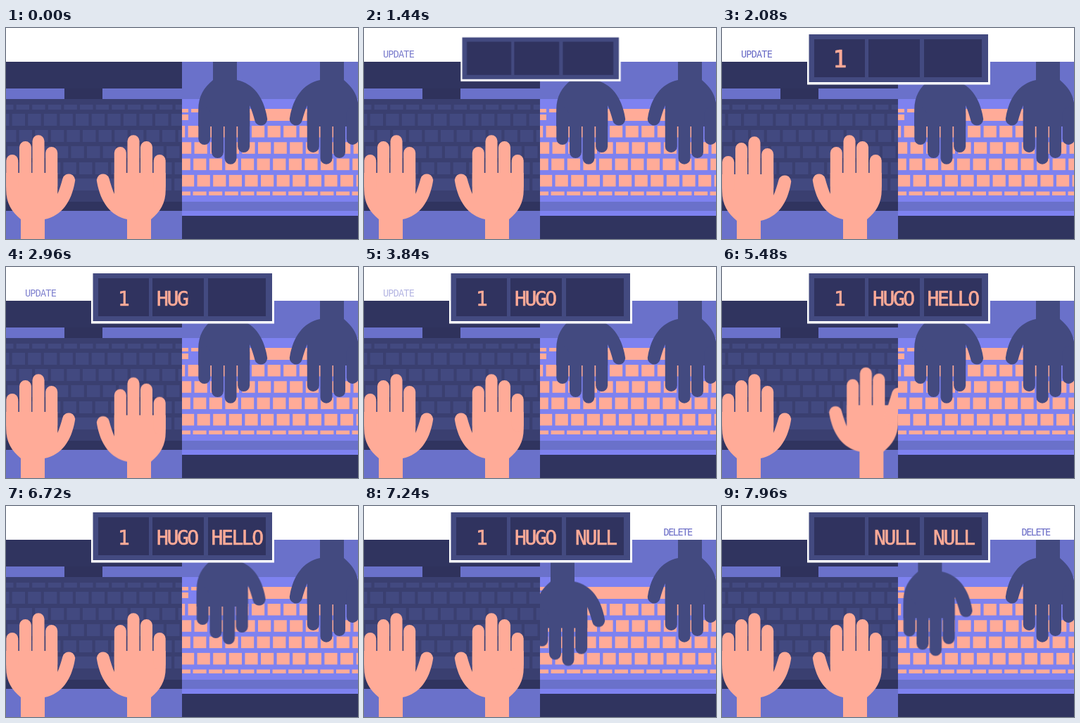
Recreate the animation shown at these times as an HTML page. Size 500 by 300 pixels, loop 8000 ms.

```html
<!DOCTYPE html>
<html lang="en">
<head>
<meta charset="utf-8">
<title>Update and delete</title>
<style>
html, body { margin: 0; width: 100%; height: 100%; overflow: hidden; background: #fff; }
svg { display: block; width: 100%; height: 100%; }
text { font-family: "DejaVu Sans Mono", "Liberation Mono", monospace; }
.label { font-size: 13.5px; letter-spacing: -.8px; fill: #696bc6; }
.word { font-size: 28px; letter-spacing: -2.4px; fill: #ffab98; stroke: #ffab98; stroke-width: .6px; }
.finger { fill: none; stroke: currentColor; stroke-width: 17px; stroke-linecap: round; }

.hand, .panel, .label, .word, #pinky { animation: 8s ease-in-out infinite; }
.word { animation-timing-function: step-end; }
.panel, #one { transform-box: fill-box; transform-origin: center; }

.panel { animation-name: panel; }
#update { animation-name: update; }
#delete { animation-name: delete; letter-spacing: -1.45px; }
#one { animation-name: one; animation-timing-function: ease-out; }
#name { animation-name: name; }
#greeting { animation-name: greeting; }
#nullName { animation-name: nullName; }
#nullGreeting { animation-name: nullGreeting; }
#left { animation-name: left; }
#right { animation-name: right; }
#pinky { animation-name: pinky; transform-origin: 218px 216px; }
#eraser { animation-name: eraser; }

@keyframes panel {
  0%, 15% { transform: scale(0); }
  19%, 100% { transform: scale(1); }
}
@keyframes update {
  0%, 16.5% { opacity: 0; }
  18.5%, 32% { opacity: 1; animation-timing-function: linear; }
  63%, 100% { opacity: 0; }
}
@keyframes delete {
  0%, 85.5% { opacity: 0; }
  88%, 100% { opacity: 1; }
}
@keyframes one {
  0%, 25.45% { opacity: 0; transform: scale(1.3); }
  25.5% { opacity: 1; transform: scale(1.3); }
  28%, 95.45% { opacity: 1; transform: none; }
  95.5%, 100% { opacity: 0; transform: none; }
}
@keyframes name {
  0% { clip-path: inset(0 100% 0 0); }
  29.5% { clip-path: inset(0 75% 0 0); }
  32% { clip-path: inset(0 50% 0 0); }
  34.5% { clip-path: inset(0 25% 0 0); }
  37.5% { clip-path: inset(0 -10% 0 0); }
  92%, 100% { clip-path: inset(0 100% 0 0); }
}
@keyframes greeting {
  0% { clip-path: inset(0 100% 0 0); }
  49% { clip-path: inset(0 80% 0 0); }
  52.5% { clip-path: inset(0 60% 0 0); }
  55.5% { clip-path: inset(0 40% 0 0); }
  58.5% { clip-path: inset(0 20% 0 0); }
  61.5% { clip-path: inset(0 -10% 0 0); }
  88.5%, 100% { clip-path: inset(0 100% 0 0); }
}
@keyframes nullName { 0% { opacity: 0; } 92%, 100% { opacity: 1; } }
@keyframes nullGreeting { 0% { opacity: 0; } 88.5%, 100% { opacity: 1; } }
@keyframes left {
  0%, 19.5% { transform: none; }
  22.5% { transform: translate(5px, -16px); }
  24% { transform: translate(5px, -12px); }
  26% { transform: translate(0, 2px); }
  27.5% { transform: none; }
  29.5% { transform: translate(0, 5px); }
  30.5% { transform: none; }
  32% { transform: translate(4px, -7px); }
  33% { transform: none; }
  34.5% { transform: translate(-1px, 5px); }
  36.5%, 100% { transform: none; }
}
@keyframes right {
  0%, 36% { transform: none; }
  37.5% { transform: translate(0, 6px); }
  39.5%, 48% { transform: none; }
  49% { transform: translate(0, 5px); }
  51% { transform: none; }
  52.5% { transform: translate(-2px, -6px); }
  54% { transform: none; }
  55.5% { transform: translate(4px, 5px); }
  57% { transform: translate(4px, 0); }
  58.5% { transform: translate(4px, 5px); }
  60% { transform: translate(4px, -2px); }
  61.5% { transform: translate(6px, -7px); }
  63% { transform: none; }
  66%, 67.5% { transform: translate(27px, -11px); }
  71.5%, 100% { transform: none; }
}
@keyframes pinky {
  0%, 63% { transform: none; }
  66%, 67.5% { transform: rotate(20deg); }
  71.5%, 100% { transform: none; }
}
@keyframes eraser {
  0%, 83.1% { transform: none; }
  87.5% { transform: translate(-29px, 34px); }
  88.5% { transform: translate(-29px, 37px); }
  90% { transform: translate(-29px, 33px); }
  92%, 97% { transform: translate(-29px, 37px); animation-timing-function: linear; }
  100% { transform: translate(-13px, 16px); }
}
</style>
</head>
<body>
<svg viewBox="0 0 500 300" preserveAspectRatio="none">
  <defs>
    <clipPath id="leftHalf"><rect y="48" width="250" height="252"/></clipPath>
    <clipPath id="rightHalf"><rect x="250" y="48" width="250" height="252"/></clipPath>
    <g id="palm">
      <path class="finger" d="M27.5 169.5V225M46 160.7V225M64.7 177.5V225"/>
      <path d="M.2 206H73.2V236Q77 227 80.5 214A8.8 8.8 0 0 1 97.8 219C93 247 79 267 55 272V400H21V272C8 261 .2 249 .2 230Z" fill="currentColor"/>
    </g>
    <path id="littleFinger" class="finger" d="M8.8 188.5V225"/>
    <g id="hand"><use href="#palm"/><use href="#littleFinger"/></g>
  </defs>

  <g clip-path="url(#leftHalf)">
    <rect y="48" width="250" height="252" fill="#30345f"/>
    <rect y="86" width="250" height="15" fill="#6a71ca"/>
    <rect x="83" y="86" width="54" height="15" fill="#2f325c"/>
    <rect y="101" width="250" height="146" fill="#3a3f70"/>
    <g id="darkKeys" fill="#424980"/>
    <rect y="260" width="250" height="40" fill="#6a71ca"/>
    <g color="#ffab98">
      <g id="left" class="hand"><use href="#hand"/></g>
      <g id="right" class="hand">
        <use href="#palm" transform="translate(227) scale(-1 1)"/>
        <g id="pinky"><use href="#littleFinger" transform="translate(227) scale(-1 1)"/></g>
      </g>
    </g>
  </g>

  <g clip-path="url(#rightHalf)">
    <rect x="250" y="48" width="250" height="252" fill="#6a71ca"/>
    <rect x="250" y="101" width="250" height="146" fill="#7e82f0"/>
    <rect x="250" y="260" width="250" height="7" fill="#7e82f0"/>
    <g id="brightKeys" fill="#ffab98"/>
    <rect x="250" y="267" width="250" height="33" fill="#30345f"/>
    <g color="#434a80">
      <g id="eraser" class="hand"><use href="#hand" transform="translate(273 346) scale(1 -1)"/></g>
      <use href="#hand" transform="translate(501 346) scale(-1 -1)"/>
    </g>
  </g>

  <text id="update" class="label" x="27" y="42">UPDATE</text>
  <text id="delete" class="label" x="425.5" y="42">DELETE</text>

  <g class="panel">
    <rect x="121" y="6" width="260" height="74.5" fill="#fff"/>
    <rect x="123.5" y="9" width="254.5" height="68" fill="#434a80"/>
    <path d="M131 16H203V70H131ZM208 16H281V70H208ZM287 16H369V70H287Z" fill="#30335f"/>
    <text id="one" class="word" x="159" y="54.5">1</text>
    <text id="name" class="word" x="214" y="54.5">HUGO</text>
    <text id="greeting" class="word" x="291.5" y="54.5">HELLO</text>
    <text id="nullName" class="word" x="216" y="54.5">NULL</text>
    <text id="nullGreeting" class="word" x="300" y="54.5">NULL</text>
  </g>
</svg>
<script>
const byId = id => document.getElementById(id);

function addKey(group, x, y, width, height) {
  const key = document.createElementNS(group.namespaceURI, "rect");
  Object.entries({ x, y, width, height }).forEach(([name, value]) => key.setAttribute(name, value));
  group.append(key);
}

function addRow(group, start, end, y, width, height, pitch = 22.6) {
  for (let x = start; x < end; x += pitch) addKey(group, x, y, width, height);
}

const dark = byId("darkKeys");
addRow(dark, -8, 250, 109, 18.5, 7);
[-14, -4, 2, -9].forEach((start, row) => addRow(dark, start, 250, 122 + row * 23, 18.5, 17));
addRow(dark, -8, 40, 214, 18.5, 17);
addKey(dark, 60, 214, 130, 17);
addRow(dark, 194, 250, 214, 18.5, 17);

const bright = byId("brightKeys");
addRow(bright, 240.5, 290, 115, 18.5, 5);
addKey(bright, 240.5, 123, 18.5, 8);
addKey(bright, 296, 115, 140, 17);
addRow(bright, 440, 500, 115, 18.5, 17);
[236, 245, 243.6, 249].forEach((start, row) =>
  addRow(bright, start, 500, 139 + row * 23.3, 18.2, 16.5));
addRow(bright, 243, 500, 232.5, 19, 5.5);
</script>
</body>
</html>
```
